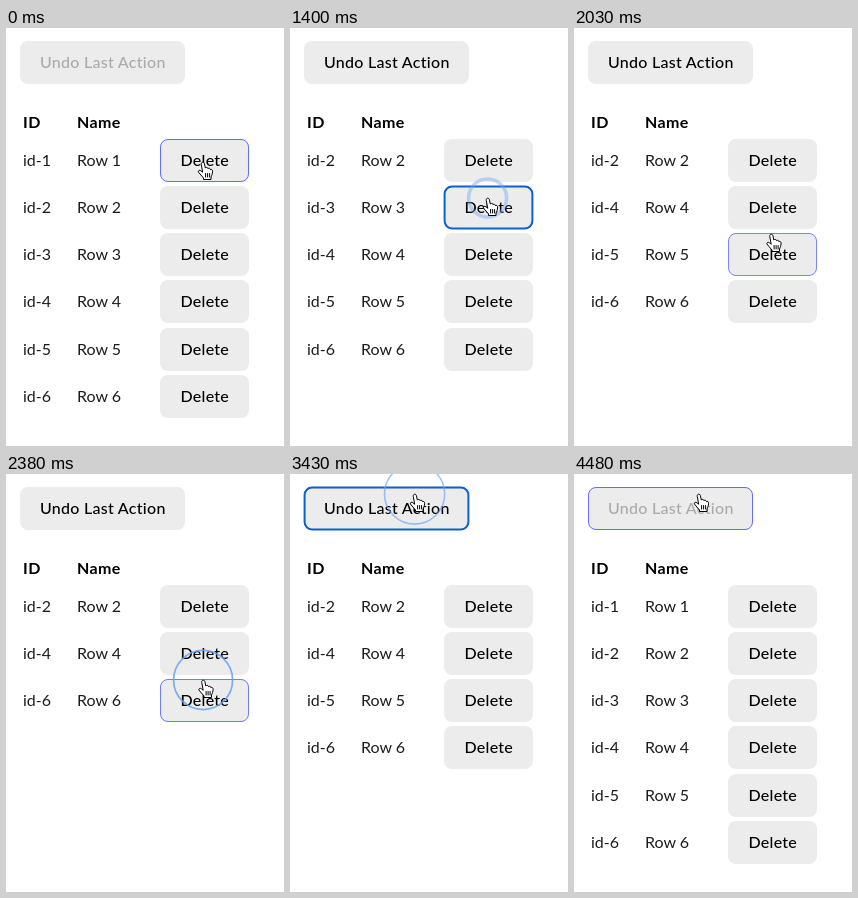
An HTML page for the animation above (4.55 s loop, 278 by 418 pixels).

```html
<!DOCTYPE html>
<html lang="en">
<head>
<meta charset="utf-8">
<title>Undo list</title>
<style>
  html, body { margin: 0; width: 100%; height: 100%; overflow: hidden; background: #fff; }
  svg { display: block; width: 278px; height: 418px; }
  text { font: 400 16px Lato, "Open Sans", sans-serif; fill: #000; }
  .cell { fill: #1c1c1c; }
  .head { font-weight: 700; letter-spacing: .4px; }
  .label { font-weight: 500; letter-spacing: .28px; text-anchor: middle; }
  .face { fill: #ececec; }
  .hover { fill: none; stroke: #646cff; }
  .focus { fill: none; stroke: #0a62cc; stroke-width: 2; }
  .off .label { fill: #aaa; }
  #ring { fill: none; stroke: #6aa5ef; }
  #hand { stroke: #000; stroke-linejoin: round; stroke-linecap: round; }
</style>
</head>
<body>
<svg viewBox="0 0 278 418">
  <g id="undo"></g>
  <text class="head" x="17" y="100">ID</text>
  <text class="head" x="71" y="100">Name</text>
  <g id="rows"></g>
  <circle id="ring"/>
  <g id="hand">
    <path fill="#fff" d="M-1.8 1.9C-2-.2 1-.5 1.4 1.6L2.3 6C2.9 5 4.8 5.2 5 6.7 5.7 5.8 7.3 6.2 7.4 7.6 8.4 7 9.7 7.7 9.6 9.2 9.6 12 8.6 13.5 8 15V17.5H.5V16C-1 14-3.3 12-4.6 10-5.2 8.6-3.4 7.7-2.1 8.8L-.6 10Z"/>
    <path fill="none" d="M2.6 11.5V15M4.6 11.5V15M6.6 11.5V15"/>
  </g>
</svg>
<script>
const LOOP = 4550, STEP = 70, FADE = 250, RING = 400;
const $ = id => document.getElementById(id);

// Times in ms: hover and focus spans, and when a row is gone
const rows = [
  { hover: [-999, 800], focus: [760, 800], gone: [800, 4000] },
  { hover: [800, 1120] },
  { hover: [1150, 1450], focus: [1370, 1450], gone: [1450, 3600] },
  { hover: [1460, 1770] },
  { hover: [1890, 2200], focus: [2110, 2200], gone: [2200, 3220] },
  { hover: [2210, 2480] }
];
const undo = { hover: [2690, 9999], focus: [3130, 4000] };
const clicks = [760, 1370, 2110, 3130, 3530, 3910];

// Pointer moves: start, end, x, y
const start = [197, 134];
const moves = [
  [0, 280, 199, 136],
  [1040, 1370, 198, 170],
  [1690, 1960, 197.5, 206],
  [2450, 2850, 125, 20]
];

const clamp = v => Math.max(0, Math.min(1, v));
const easeOut = (u, power = 2) => 1 - (1 - clamp(u)) ** power;
const within = (t, span) => !!span && t >= span[0] && t < span[1];

function box(cls, x, y, w, inset) {
  return `<rect class="${cls}" x="${x + inset}" y="${y + inset}" width="${w - 2 * inset}" height="${43 - 2 * inset}" rx="${8 - inset}"/>`;
}

function buildButton(item, node, x, y, w, label) {
  node.innerHTML += box("face", x, y, w, 0) +
    `<text class="label" x="${x + w / 2 + .3}" y="${y + 27}">${label}</text>` +
    box("hover", x, y, w, .5) + box("focus", x, y, w, .6);
  item.node = node;
  item.hoverBox = node.querySelector(".hover");
  item.focusBox = node.querySelector(".focus");
}

buildButton(undo, $("undo"), 14, 13, 165, "Undo Last Action");
rows.forEach((row, i) => {
  const g = document.createElementNS("http://www.w3.org/2000/svg", "g");
  g.innerHTML = `<text class="cell" x="17" y="27">id-${i + 1}</text><text class="cell" x="71" y="27">Row ${i + 1}</text>`;
  $("rows").append(g);
  buildButton(row, g, 154, 0, 89, "Delete");
});

function paintButton(item, t) {
  const [a, b] = item.hover;
  const glow = easeOut((Math.min(t, b) - a) / FADE) * (1 - easeOut((t - b) / FADE));
  item.hoverBox.style.opacity = glow;
  item.focusBox.style.opacity = within(t, item.focus) ? 1 : 0;
}

function pointer(t) {
  let [x, y] = start;
  for (const [a, b, toX, toY] of moves) {
    const k = easeOut((t - a) / (b - a), 3);
    x += (toX - x) * k;
    y += (toY - y) * k;
  }
  return [x, y];
}

function paint(t) {
  let slot = 0;
  for (const row of rows) {
    const gone = within(t, row.gone);
    row.node.style.display = gone ? "none" : "";
    if (gone) continue;
    row.node.setAttribute("transform", `translate(0 ${111 + Math.floor(47.25 * slot++)})`);
    paintButton(row, t);
  }
  paintButton(undo, t);
  undo.node.classList.toggle("off", slot === rows.length);

  const [x, y] = pointer(t);
  $("hand").setAttribute("transform", `translate(${x} ${y})`);

  const click = clicks.find(c => t >= c && t < c + RING);
  const age = click === undefined ? RING : t - click;
  const u = age / RING, ring = $("ring");
  ring.setAttribute("cx", x - .4);
  ring.setAttribute("cy", y);
  ring.setAttribute("r", 17 + 14 * easeOut(u));
  ring.style.strokeWidth = 3.8 - 3 * u;
  ring.style.opacity = .85 * clamp(age / 60) * clamp((1 - u) / .32);
}

const origin = performance.now();
function tick() {
  const t = (performance.now() - origin) % LOOP;
  paint(Math.floor(t / STEP) * STEP);
  requestAnimationFrame(tick);
}
tick();
</script>
</body>
</html>
```
